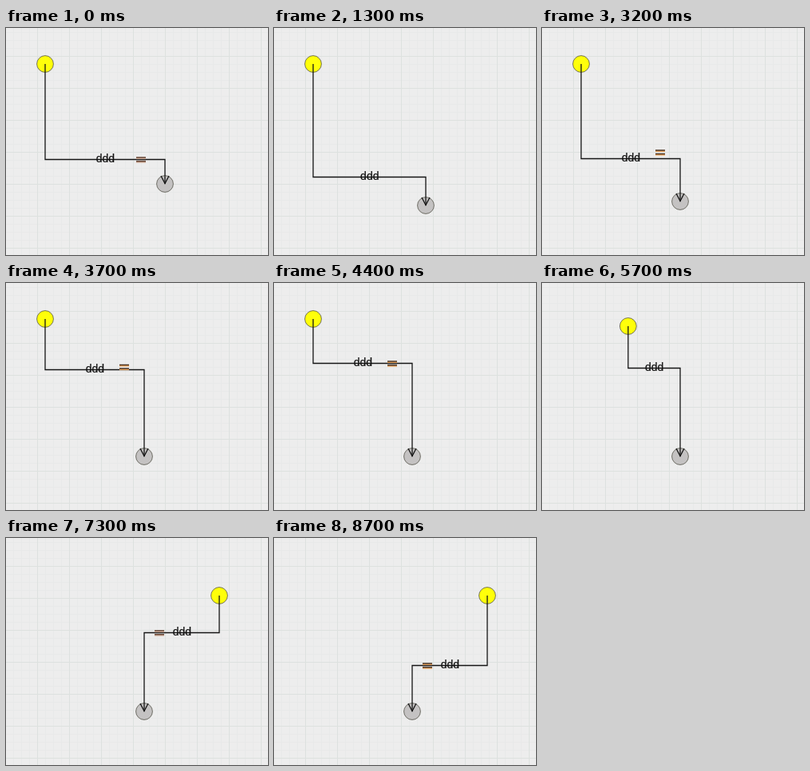
An HTML page for the animation above (9.8 s loop, 328 by 284 pixels).

```html
<!DOCTYPE html>
<html lang="en">
<head>
<meta charset="utf-8">
<title>Connector editing</title>
<style>
  html, body { margin: 0; width: 100%; height: 100%; overflow: hidden; background: #ededed; }
  svg { display: block; }
  text { font: 14px "Liberation Sans", Arial, sans-serif; text-anchor: middle; fill: #111; stroke: #111; stroke-width: .2px; }
  circle { stroke: #55534a; stroke-width: .8px; }
  .edge { fill: none; stroke: #151515; stroke-width: 1.3px; }
  .handle path { fill: none; stroke-width: 1.5px; }
  .bars { stroke: #63402f; }
  .glow { stroke: #d8b4a0; }
  .used .bars { stroke: #4a3220; }
  .used .glow { stroke: #eda45a; }
</style>
</head>
<body>
<svg width="328" height="284" viewBox="0 0 328 284">
  <defs>
    <pattern id="grid" x="39" y="35" width="40" height="40" patternUnits="userSpaceOnUse">
      <path d="M10.5 0V40M20.5 0V40M30.5 0V40M0 10.5H40M0 20.5H40M0 30.5H40" stroke="#e8e9e9"/>
      <path d="M.5 0V40M0 .5H40" stroke="#dde1df"/>
    </pattern>
  </defs>
  <rect width="328" height="284" fill="#ededed"/>
  <rect width="328" height="284" fill="url(#grid)"/>
  <circle id="start" r="10.4" fill="#ffff0a"/>
  <circle id="end" r="10.4" fill="#c4c2c2"/>
  <path id="edge" class="edge"/>
  <path id="arrow" class="edge" d="M-5 -9.5L0 0L5 -9.5"/>
  <g id="handle" class="handle">
    <path class="glow" d="M-6 -1.2H6M-6 3.4H6"/>
    <path class="bars" d="M-6 -2.4H6M-6 2.2H6"/>
  </g>
  <text id="label">ddd</text>
</svg>
<script>
const LOOP = 9800, STEP = 100;
const $ = id => document.getElementById(id);
const move = (el, x, y) => el.setAttribute("transform", `translate(${x} ${y})`);

const progress = (t, from, to) => Math.min(1, Math.max(0, (t - from) / (to - from)));
const easeOut = (p, power) => 1 - (1 - p) ** power;
const arc = p => Math.sin(Math.PI * p);
// A dragged handle runs ahead of the line, which catches up by the end
const lead = (p, size) => p > 0 ? size * (1 - p) : 0;

// Grey node: dips below its resting place while dragged left
function endAt(t) {
  const p = progress(t, 1000, 1700);
  return [199 - 26 * p ** 1.25, 195 + 22 * easeOut(p, 5) + 6.5 * arc(p)];
}

// Yellow node: a short swing up and left, then a long drag to the right
function startAt(t) {
  const p = progress(t, 5200, 5500), q = progress(t, 5600, 6400);
  return [
    49 + 40 * p - 20 * arc(p) + 178 * q ** 1.08,
    45 - 5 * p - 8 * arc(p) + 32 * easeOut(q, 4.3)
  ];
}

function draw(now) {
  const t = Math.floor(now % LOOP / STEP) * STEP;
  const [sx, sy] = startAt(t), [ex, ey] = endAt(t);
  const up = progress(t, 3100, 4100), down = progress(t, 8200, 8700);
  const bend = .795 - .475 * easeOut(up, 2.53) + .282 * down;
  const my = Math.round(sy + (ey - sy) * bend) + .5;

  move($("start"), sx, sy);
  move($("end"), ex, ey);
  move($("arrow"), ex, ey - .5);
  $("edge").setAttribute("d", `M${sx} ${sy}V${my}H${ex}V${ey}`);
  move($("label"), (sx + ex) / 2 + .3, my + 3.7);

  const handle = $("handle");
  const shown = t < 900 || t >= 1900 && t < 5100 || t >= 7000;
  const used = up > 0 && t < 5100 || down > 0;
  move(handle, Math.round(sx + (ex - sx) * .8), my + lead(up, -9) + lead(down, 6));
  handle.style.display = shown ? "" : "none";
  handle.classList.toggle("used", used);
}

const begin = performance.now();
function tick() {
  draw(performance.now() - begin);
  requestAnimationFrame(tick);
}
tick();
</script>
</body>
</html>
```
